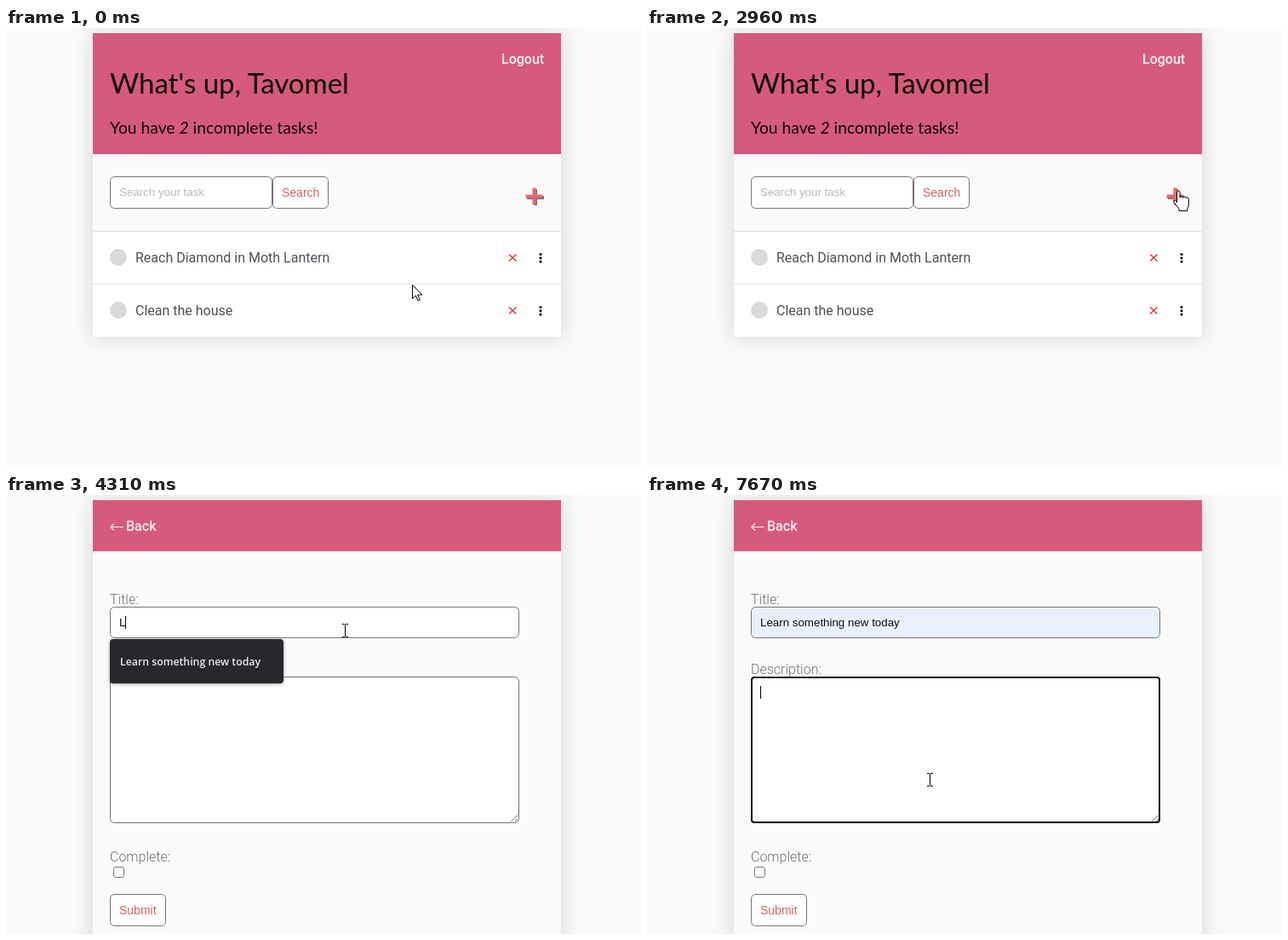
Write an HTML page that moves like this. It is 746 by 515 pixels and loops after 8000 ms.

```html
<!DOCTYPE html>
<html lang="en">
<head>
<meta charset="utf-8">
<title>Task list</title>
<style>
  html, body { margin: 0; width: 100%; height: 100%; overflow: hidden; background: #fafafa; }
  svg { display: block; width: 100%; height: 100%; }
  text { font: 16px Roboto, sans-serif; white-space: pre; }
  .card { filter: drop-shadow(0 1px 13px rgba(0, 0, 0, .15)); }
  .header { fill: #d65a7d; }
  .heading { font-family: Lato, sans-serif; fill: #0b0809; }
  .nav { font-weight: 500; fill: #f5f0ea; }
  .title { fill: #4b5156; }
  .label { font-weight: 300; fill: #6c7076; }
  .field { fill: #fff; stroke: #757575; }
  .input { font: 13.333px "Liberation Sans", Arial, sans-serif; fill: #111; }
  .hint { fill: #b9b9b9; }
  .button { font: 14px "Liberation Sans", Arial, sans-serif; fill: #d5616a; }
  .option { font: 600 12.3px "Open Sans", sans-serif; fill: #e8eaed; }
  .line { fill: none; stroke: #e1e1e8; }
  .pointer { fill: #fff; stroke: #000; }
</style>
</head>
<body>
<svg viewBox="0 0 746 515">
  <g id="list">
    <rect class="card" x="102" y="6" width="550" height="356" fill="#fff"/>
    <rect class="header" x="102" y="6" width="550" height="142"/>
    <text class="nav" x="582" y="42">Logout</text>
    <text class="heading" x="122" y="77" style="font-size:33px">What's up, Tavomel</text>
    <text class="heading" x="122" y="124" style="font-size:19.3px">You have <tspan font-style="italic">2</tspan> incomplete tasks!</text>
    <rect x="102" y="148" width="550" height="90" fill="#fafafa"/>
    <rect class="field" x="122.5" y="174.5" width="190" height="37" rx="5"/>
    <text class="input hint" x="133" y="197">Search your task</text>
    <rect class="field" x="313.5" y="174.5" width="65" height="37" rx="5"/>
    <text class="button" x="324" y="198">Search</text>
    <g fill="none" stroke-width="4">
      <path d="M612 199H632M622 189V208" stroke="#74708a"/>
      <path d="M610.500 197.500H630.500M620.500 187.500V207" stroke="#e56b6a"/>
    </g>
    <path class="line" d="M102 238.500H652M102 300.500H652"/>
    <g id="tasks"></g>
  </g>

  <g id="form">
    <rect class="card" x="102" y="6" width="550" height="540" fill="#fafafa"/>
    <rect class="header" x="102" y="6" width="550" height="60"/>
    <path d="M137.500 37.500H123M127 33.500L123 37.500L127 41.500" fill="none" stroke="#f5f0ea" stroke-width="1.2"/>
    <text class="nav" x="141" y="42">Back</text>
    <text class="label" x="122" y="128">Title:</text>
    <rect class="field" id="titleField" x="122.500" y="131.500" width="480" height="36" rx="5"/>
    <text class="input" id="typed" x="133" y="154"></text>
    <text class="label" x="122" y="210">Description:</text>
    <rect class="field" x="122.500" y="213.500" width="480" height="171" rx="5"/>
    <path d="M593.500 383L601 375.500M598 383L601 380" stroke="#666" fill="none"/>
    <rect id="focusRing" x="123" y="214" width="479" height="170" rx="3" fill="none" stroke="#101010" stroke-width="2"/>
    <text class="label" x="122" y="430">Complete:</text>
    <rect class="field" x="126.500" y="436.500" width="12" height="12" rx="2.500"/>
    <rect class="field" x="122.500" y="468.500" width="65" height="37" rx="5"/>
    <text class="button" x="133" y="492">Submit</text>
    <rect id="caret" width="1" height="15" fill="#000"/>
    <g id="menu">
      <rect id="menuBox" x="122" y="169" rx="4" fill="#26282d" style="filter:drop-shadow(0 1px 2px rgba(0,0,0,.35))"/>
      <rect id="menuHover" x="122" y="177" width="204" height="36" fill="#3d3f41"/>
      <g id="options"></g>
    </g>
  </g>

  <circle id="click" r="12" fill="#ff0" fill-opacity=".47"/>
  <g id="cursor">
    <path id="arrow" class="pointer" d="M.5 .5V16.500L4.300 12.900L7 18.900L9.300 17.900L6.700 12H11.800Z"/>
    <path id="hand" class="pointer" d="M-1.500 14V1.800a1.800 1.800 0 0 1 3.600 0V8q0-1.600 1.800-1.600t1.800 1.800q.2-1.300 1.800-1.300t1.800 1.800q.3-1 1.500-1t1.600 1.800V16q0 3-1.600 5V23.500H1V21.500q-1.500-2.600-4-5.500q-3-3.400-2.400-4.600q1-1.600 3.900 1.600z"/>
    <path id="beam" d="M-3 -7.500H0M1 -7.500H4M-3 7.500H0M1 7.500H4M.5 -7V7" fill="none" stroke="#000"/>
  </g>
</svg>
<script>
const LOOP = 8000;
const TITLE = 'Learn something new today';
const tasks = ['Reach Diamond in Moth Lantern', 'Clean the house'];
const history = [TITLE, ...tasks, 'Water the plants', 'Finish the report', 'Buy some groceries'];
const svgNS = 'http://www.w3.org/2000/svg';
const $ = id => document.getElementById(id);
const show = (id, on) => { $(id).style.display = on ? '' : 'none'; };
const setAttrs = (node, attrs) => {
  for (const key in attrs) node.setAttribute(key, attrs[key]);
};

$('tasks').innerHTML = tasks.map((name, i) => `
  <g transform="translate(0 ${i * 62})">
    <circle cx="132" cy="269" r="10" fill="#dadada"/>
    <text class="title" x="152" y="275">${name}</text>
    <path d="M591 265.500L599.500 273.500M599.500 265.500L591 273.500" stroke="#cf4949" stroke-width="1.700"/>
    ${[265.5, 269.8, 274.1].map(y => `<circle cx="628" cy="${y}" r="1.600" fill="#111"/>`).join('')}
  </g>`).join('');
$('options').innerHTML = history.map((name, i) =>
  `<text class="option" x="134" y="${200 + i * 36}">${name}</text>`).join('');

// Each row changes part of the state and keeps the rest.
const changes = [
  [0, { page: 'list', click: false, typed: 0, caret: '', rows: 0, hover: false, filled: false, ring: false }],
  [2820, { click: true }],
  [2960, { click: false }],
  [3110, { page: 'form' }],
  [3980, { click: true, caret: 'title' }],
  [4110, { click: false, rows: 6 }],
  [4310, { typed: 1, rows: 1 }],
  [4510, { typed: 2 }],
  [4780, { typed: 3 }],
  [4980, { typed: 4 }],
  [5450, { typed: TITLE.length, filled: true, hover: true, caret: '' }],
  [5920, { rows: 0, hover: false }],
  [5980, { caret: 'title' }],
  [6450, { caret: '' }],
  [7000, { caret: 'title' }],
  [7530, { caret: '', click: true }],
  [7600, { caret: 'description', ring: true }],
  [7670, { click: false }]
];

// Pointer moves are sampled in a fixed number of visible steps.
const moves = [
  [530, 1280, 12, 'M477 301C400 240 240 70 234 101C228 145 290 330 366 312'],
  [1340, 1410, 2, 'M366 312H392'],
  [1610, 1940, 6, 'M392 312C450 312 590 220 629 136'],
  [2210, 2560, 6, 'M629 136Q630 170 624 191'],
  [3110, 3580, 7, 'M624 191Q510 190 398 159'],
  [6450, 6730, 5, 'M398 159Q385 270 332 334']
].map(([start, end, steps, d]) => {
  const path = document.createElementNS(svgNS, 'path');
  path.setAttribute('d', d);
  return { start, end, steps, path, length: path.getTotalLength() };
});

const ease = p => p * p * p * (p * (6 * p - 15) + 10);

function stateAt(t) {
  return Object.assign({}, ...changes.filter(([at]) => at <= t).map(([, part]) => part));
}

function pointerAt(t) {
  const move = moves.filter(m => m.start <= t).pop();
  if (!move) return moves[0].path.getPointAtLength(0);
  const { start, end, steps, path, length } = move;
  const step = Math.min(steps, 1 + Math.floor((t - start) / (end - start) * (steps - 1) + 1e-6));
  return path.getPointAtLength(length * ease(step / steps));
}

function pointerShape(page, x, y) {
  const inside = (left, top, right, bottom) => x > left && x < right && y > top && y < bottom;
  if (page === 'list') return inside(609, 186, 633, 210) ? 'hand' : 'arrow';
  return inside(122, 131, 603, 168) || inside(122, 213, 603, 385) ? 'beam' : 'arrow';
}

function draw(t) {
  const s = stateAt(t);
  show('list', s.page === 'list');
  show('form', s.page === 'form');

  $('typed').textContent = TITLE.slice(0, s.typed);
  $('titleField').style.fill = s.filled ? '#e8f0fe' : '#fff';
  show('focusRing', s.ring);
  show('caret', s.caret);
  if (s.caret) {
    const inTitle = s.caret === 'title';
    const advance = inTitle && s.typed ? $('typed').getComputedTextLength() : 0;
    setAttrs($('caret'), { x: Math.round(133 + advance), y: inTitle ? 142 : 224 });
  }

  show('menu', s.rows);
  show('menuHover', s.hover);
  setAttrs($('menuBox'), { width: s.rows > 1 ? 228 : 204, height: 16 + 36 * s.rows });
  [...$('options').children].forEach((row, i) => { row.style.display = i < s.rows ? '' : 'none'; });

  const point = pointerAt(t);
  const x = Math.round(point.x), y = Math.round(point.y);
  const shape = pointerShape(s.page, x, y);
  for (const id of ['arrow', 'hand', 'beam']) show(id, id === shape);
  setAttrs($('cursor'), { transform: `translate(${x} ${y})` });
  show('click', s.click);
  setAttrs($('click'), { cx: x, cy: y });
}

const began = performance.now();
function tick() {
  draw((performance.now() - began) % LOOP);
  requestAnimationFrame(tick);
}
tick();
</script>
</body>
</html>
```
